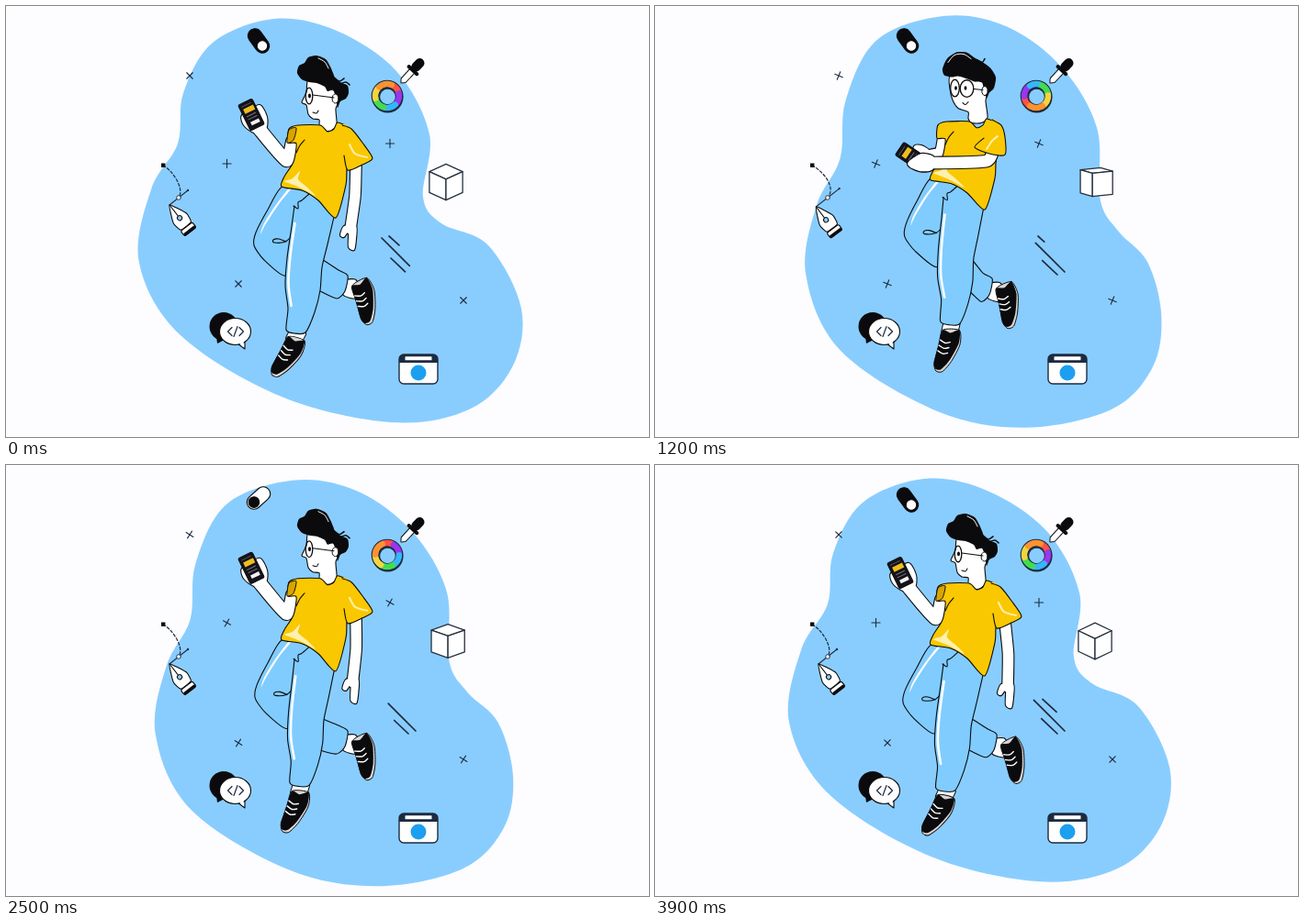
Recreate the animation shown at these times as an HTML page with a canvas. Size 700 px wide and 470 px high, loop 4 s.

```html
<!DOCTYPE html>
<html lang="en">
<head>
<meta charset="utf-8">
<title>Floating developer</title>
<style>
html, body { margin: 0; width: 100%; height: 100%; overflow: hidden; background: #fdfcfe; }
canvas { display: block; }
</style>
</head>
<body>
<canvas id="stage" width="700" height="470"></canvas>
<script>
const ctx = document.getElementById('stage').getContext('2d');
const LOOP = 4000, STEP = 100;
const INK = '#0b0b0d', NAVY = '#1d2b40', SKY = '#89cdff', DENIM = '#80ccff';
const YELLOW = '#fac800', CREAM = '#fff0ae', WHITE = '#fff';

const mix = (a, b, k) => a + (b - a) * k;
const clamp = x => Math.max(0, Math.min(1, x));
const span = (t, from, to) => clamp((t - from) / (to - from));
const ease = (t, from, to) => { const x = span(t, from, to); return x * x * (3 - 2 * x); };
const bump = (t, from, to) => Math.sin(Math.PI * span(t, from, to)) ** 2;
const pairs = list => Array.from({ length: list.length / 2 }, (_, i) => [list[2 * i], list[2 * i + 1]]);
const morph = (a, b, k) => a.map((p, i) => [mix(p[0], b[i][0], k), mix(p[1], b[i][1], k)]);

function trace(pts, closed = true, k = 0.12) {
  const n = pts.length;
  const at = i => closed ? pts[(i + n) % n] : pts[Math.max(0, Math.min(n - 1, i))];
  ctx.beginPath();
  ctx.moveTo(...pts[0]);
  for (let i = 0; i < (closed ? n : n - 1); i++) {
    const a = at(i - 1), b = at(i), c = at(i + 1), d = at(i + 2);
    ctx.bezierCurveTo(b[0] + (c[0] - a[0]) * k, b[1] + (c[1] - a[1]) * k,
      c[0] - (d[0] - b[0]) * k, c[1] - (d[1] - b[1]) * k, c[0], c[1]);
  }
  if (closed) ctx.closePath();
}
function paint(fill, stroke, width = 1.1) {
  if (fill) { ctx.fillStyle = fill; ctx.fill(); }
  if (stroke) { ctx.strokeStyle = stroke; ctx.lineWidth = width; ctx.stroke(); }
}
function shape(pts, fill, stroke, width, k) { trace(pts, true, k); paint(fill, stroke, width); }
function wire(list, color = INK, width = 1.1, k = 0.16) { trace(pairs(list), false, k); paint(null, color, width); }
function oval(x, y, rx, ry, fill, stroke, width) {
  ctx.beginPath(); ctx.ellipse(x, y, rx, ry, 0, 0, 7); paint(fill, stroke, width);
}
function box(x, y, w, h, r, fill, stroke, width) {
  ctx.beginPath(); ctx.roundRect(x, y, w, h, r); paint(fill, stroke, width);
}
function placed(x, y, degrees, draw) {
  ctx.save(); ctx.translate(x, y); ctx.rotate(degrees * Math.PI / 180); draw(); ctx.restore();
}

const BLOB_WIDE = pairs([292,14, 360,27, 425,71, 461,140, 454,208, 474,237, 525,261, 561,330, 551,394,
  504,440, 420,454, 300,426, 190,359, 145,280, 158,200, 187,150, 193,95, 225,40]);
const BLOB_TALL = pairs([322,10, 390,22, 448,67, 486,132, 492,212, 512,248, 539,284, 549,340, 539,395,
  495,440, 400,461, 310,446, 206,381, 169,297, 180,222, 205,170, 211,105, 246,36]);

function drawBlob(t) {
  const tall = t < 2000 ? Math.sin(Math.PI * t / LOOP) : 2 - t / 2000;
  const dip = 8 * Math.sin(Math.PI * span(t, 2000, LOOP));
  const pts = morph(BLOB_WIDE, BLOB_TALL, tall).map(([x, y]) => [x, y + dip * (1 - y / 460)]);
  shape(pts, SKY, null, 0, 1 / 6);
}

function drawToggle(t) {
  const on = ease(t, 1400, 1800) - ease(t, 2700, 3100);
  const light = on > 0.5;
  placed(275, 38 - 2 * on, 54 + 84 * on, () => {
    box(-14.5, -7.7, 29, 15.4, 7.7, light ? WHITE : INK, INK);
    oval(6.8, 0, 5.8, 5.8, light ? INK : WHITE, INK);
  });
}

function drawCrosses(t) {
  const sway = 45 - 25 * bump(t % 2000, 0, 2000), turn = 34 * bump(t, 0, LOOP);
  for (const [x, y, angle] of [[200, 76, sway], [253, 303, sway], [498, 321, sway], [240.5, 172, turn], [418, 150, turn]])
    placed(x, y, angle, () => { wire([-4.6,0, 4.6,0], NAVY); wire([0,-4.6, 0,4.6], NAVY); });
}

function drawPen(t) {
  const pull = bump(t, 0, 1400);
  const x = 178 - 14 * pull, y = 217 + 10 * pull, nx = 188, ny = 209;
  const ex = 2 * nx - x, ey = 2 * ny - y;
  ctx.setLineDash([3, 2.2]);
  ctx.beginPath(); ctx.moveTo(171, 174);
  ctx.bezierCurveTo(180, 178, mix(nx, ex, 1.3) - 6, mix(ny, ey, 1.3), nx, ny);
  paint(null, NAVY, 1.2);
  ctx.setLineDash([]);
  box(169, 171.5, 4.4, 4.4, 0, INK);
  wire([x, y, ex, ey], NAVY);
  oval(ex, ey, 1.2, 1.2, NAVY);
  oval(nx, ny, 2.3, 2.3, WHITE, NAVY, 0.9);
  placed(x, y, -38 + 6 * pull, () => {
    shape(pairs([0,0, 5,9, 9,19, 7,29, -7,29, -9,19, -5,9]), WHITE, INK, 1.1, 0.08);
    wire([0,0, 0,15], INK, 1);
    oval(0, 18, 2.6, 2.6, SKY, INK, 1);
    box(-8, 30, 16, 7, 2, WHITE, INK);
    box(-8, 34, 16, 3.5, 1.5, INK);
  });
}

function drawWheel(t) {
  oval(415.5, 99.5, 17, 17, NAVY);
  placed(415, 98, 320 - 360 * (1 - t / LOOP) ** 2.1, () => {
    ['#ff5145', '#9836f0', '#35b7fb', '#43dc50', '#f4d43d', '#ff922f'].forEach((color, i) => {
      const mid = i * Math.PI / 3;
      ctx.beginPath(); ctx.arc(0, 0, 13, mid - 0.53, mid + 0.53); paint(null, color, 7);
    });
  });
  oval(415, 98, 16.8, 16.8, null, NAVY);
  oval(415, 98, 9.7, 9.7, NAVY);
  oval(415.5, 99, 8.3, 8.3, SKY);
  placed(430, 84, 43, () => {
    shape(pairs([0,0, 3.3,-4, 3.3,-18, -3.3,-18, -3.3,-4]), WHITE, INK, 1, 0.03);
    box(-8, -21, 16, 4, 2, INK);
    box(-5.2, -35, 10.4, 16, 5.2, INK);
  });
}

function drawCube(t) {
  const a = Math.PI / 4 * (1 + Math.sin(Math.PI * span(t, 700, 2500) ** 1.3) ** 2);
  const b = Math.PI / 180 * (20 - 11 * Math.cos(2 * Math.PI * (t - 1450) / LOOP));
  const cx = 479 + 2.5 * bump(t, 0, LOOP), cy = 192, h = 12.8;
  const spot = ([x, y, z]) => {
    const depth = x * Math.sin(a) + z * Math.cos(a);
    return [cx + h * (x * Math.cos(a) - z * Math.sin(a)), cy + h * (y * Math.cos(b) + depth * Math.sin(b))];
  };
  const face = (...corners) => shape(corners.map(spot), WHITE, '#26303e', 1.3, 0);
  face([-1,-1,-1], [1,-1,-1], [1,-1,1], [-1,-1,1]);
  face([-1,-1,1], [1,-1,1], [1,1,1], [-1,1,1]);
  face([1,-1,1], [1,-1,-1], [1,1,-1], [1,1,1]);
}

function drawStreaks(t) {
  const cycle = LOOP / 3, phase = (t + cycle - 3) % cycle;
  const streak = (x, y, X, Y, s, e) => {
    if (e - s > 0.01) wire([mix(x, X, s), mix(y, Y, s), mix(x, X, e), mix(y, Y, e)], NAVY, 1.7);
  };
  for (const start of [625, 1180, 1303])
    streak(417, 251, 439, 271, span(phase, start + 36, start + 100), span(phase, start, start + 55));
  const tail = phase < 500 || phase > 1325 ? 0 : 1 - span(phase, 640, 1290);
  const head = phase < 500 ? 0.82 * (1 - phase / 500) : phase > 1325 ? 0.82 : 1;
  streak(409, 253, 446, 290, tail, head);
  streak(419, 275, 438, 293, tail, head);
}

function drawChat() {
  shape(pairs([229,360, 230,368, 238,364]), INK, null, 0, 0);
  oval(237, 349.5, 15.5, 15.5, INK);
  shape(pairs([252,368, 260,374, 260,365]), WHITE, INK, 1.1, 0);
  oval(249.5, 355, 17, 14.5, WHITE, INK);
  shape(pairs([251,365, 258.5,372, 259,363]), WHITE, null, 0, 0);
  for (const side of [-1, 1])
    wire([250 + 4*side,350.5, 250 + 8.5*side,355, 250 + 4*side,359.5], NAVY, 1.2, 0);
  wire([252,349.5, 248,360.5], NAVY, 1.2, 0);
}

function drawWindow() {
  box(428, 380, 42, 32, 5, WHITE, NAVY, 1.4);
  box(428, 380, 42, 9, [5, 5, 0, 0], NAVY);
  box(434.5, 382.2, 29, 4, 0.5, WHITE);
  oval(449, 400, 8.5, 8.5, '#1d9ff0');
}

function drawShoe(x, y, turn) {
  placed(x, y, turn, () => {
    shape(pairs([9,0, 13,15, 8,35, 1,48, -6,49, -10,41, -9,22, -9,4]), '#d9d4d2', INK, 0.9);
    shape(pairs([9,0, 11.5,14, 6,34, -1,46, -7,47, -10,41, -10,22, -9,4, 0,5]), INK);
    for (const row of [15, 21, 27]) wire([-9, row, -3, row + 2, 2, row], WHITE, 1.4);
  });
}

const THIGH = pairs([301,197, 285,222, 272,247, 270,261, 281,277, 304,294, 312,262, 330,205]);
const LEG = pairs([314,218, 311,240, 306,275, 304,305, 307,330, 305,353, 314,357, 326,356, 336,334, 342,310,
  344,285, 350,260, 357,230, 340,205, 325,203]);

function drawLegs(t, lift) {
  const sway = pts => pts.map(([x, y]) => [x + 6 * lift * span(y, 215, 355), y - 10 * lift]);
  const kick = bump(t, 0, 1500);
  const fx = 384 - 14 * kick, fy = 299 + 10 * kick - 8 * bump(t, 2000, LOOP);

  shape([[fx - 17, fy + 1], [fx - 4, fy - 1], [fx + 1, fy + 8], [fx - 3, fy + 20], [fx - 17, fy + 16]], WHITE, INK);
  drawShoe(fx, fy, -17 + 13 * kick);
  shape([[330, 270], [345, 277], [fx - 22, fy - 11], [fx - 12, fy - 5], [fx - 15, fy + 12], [fx - 24, fy + 20], [342, 311], [325, 303]], DENIM, INK);

  shape(sway(THIGH), DENIM, INK);
  shape(sway(pairs([306,201, 291,221, 280,239, 277,249, 282,239, 297,216, 310,200])), WHITE);
  wire(sway(pairs([313,249, 304,257, 292,258, 291,255, 297,254, 305,257])).flat());

  const [ankle] = sway([[317, 357]]), tilt = 27 - 15 * lift;
  placed(...ankle, tilt, () => box(-9, -5, 18, 16, 2, WHITE, INK, 1));
  drawShoe(ankle[0], ankle[1] + 4, tilt);
  const leg = sway(LEG);
  shape(leg, DENIM);
  trace(leg.slice(0, 13), false); paint(null, INK);
  wire(leg.slice(1, 5).flatMap(([x, y]) => [x + 3.5, y - 3]), WHITE, 2.6);
  wire(sway(pairs([330,205, 322,212, 318,214, 318,221, 313,218])).flat());
}

function drawArm(joints, width, hand) {
  trace(joints, false, 0.1); paint(null, INK, width + 2.2);
  shape(hand, WHITE, INK, 2.2);
  trace(joints, false, 0.1); paint(null, WHITE, width);
  shape(hand, WHITE);
}

function drawPhone(p, lit) {
  placed(mix(267, 279, p), mix(118.5, 173, p), mix(-26, -56, p), () => {
    box(-8.5, -15.5, 17, 31, 2, '#15131a', INK, 1);
    wire([-6,-12, 5,-12], '#55525c', 1);
    if (!lit) return;
    box(-5.5, -9, 12, 5.5, 0, '#f0bd1d');
    for (const y of [0, 3.5]) wire([-5, y, 5, y], '#77727c', 1);
    box(-4.5, 7, 10, 4, 0, '#f4f1f2');
  });
}

const SHIRT = pairs([342,130, 318,130, 308,134, 307,149, 316,150, 313,170, 303,186, 300,197, 322,201, 340,212, 359,231,
  370,195, 371,178, 374,152, 372,133, 361,127, 357,134, 350,137]);
const SLEEVE = [pairs([366,130, 376,134, 388,149, 399,166, 388,173, 372,179, 368,163]),
  pairs([367,133, 377,139, 381,152, 381,171, 364,170, 348,163, 358,153])];
const NEAR_HAND = [pairs([368,240, 364,250, 368,252, 373,246, 373,263, 379,266, 381,254, 381,240]),
  pairs([303,173, 290,170, 278,177, 275,181, 278,185, 288,189, 298,189, 303,186])];
const FAR_HAND = [pairs([257,119, 259,130, 270,138, 283,134, 284,121, 276,108]),
  pairs([282,162, 290,161, 300,168, 300,182, 288,186, 280,178])];

function drawSideHead() {
  shape(pairs([329,80, 327,94, 322,105, 327,108, 329,118, 334,123, 341,124, 341,131, 345,136, 354,136, 360,129, 359,112, 363,102, 358,92, 345,82]), WHITE, INK);
  shape(pairs([330,83, 322,80, 317,73, 319,65, 325,62, 329,56, 338,54, 348,58, 353,66, 356,73, 359,80, 366,84, 372,87, 373,95, 370,101, 364,104, 361,111, 359,99, 356,92, 350,93, 347,88, 338,84]), INK);
  wire([357,78, 363,82, 368,79], INK, 1.6);
  wire([364,85, 370,83, 374,86], INK, 1.6);
  wire([340,57, 347,61, 351,68], WHITE, 1);
  oval(358.5, 101, 3.4, 5, WHITE, INK, 1);
  oval(330, 98, 3.8, 8.8, null, INK, 1.3);
  oval(330.5, 98, 1.5, 2.4, INK);
  wire([334,97, 357,100]);
  wire([334,116, 338,117, 340,114]);
}
function drawFrontHead() {
  shape(pairs([321,77, 321,91, 324,103, 330,112, 341,116, 341,123, 345,128, 355,128, 362,122, 360,104, 362,94, 356,82, 338,74]), WHITE, INK);
  shape(pairs([323,78, 315,76, 313,69, 318,58, 328,51, 339,51, 348,57, 357,62, 365,68, 371,78, 369,90, 364,95, 361,101, 358,92, 356,84, 348,83, 340,80, 330,77]), INK);
  wire([350,59, 356,62, 359,58], INK, 1.6);
  wire([319,62, 326,54, 336,53, 344,58], WHITE, 1);
  oval(359, 93, 3.2, 5, WHITE, INK, 1);
  oval(326.5, 90, 4.8, 9.3, WHITE, INK, 1.3);
  oval(339.5, 90.5, 7.3, 9.3, WHITE, INK, 1.3);
  for (const x of [327.5, 338]) oval(x, 90, 1.4, 2.2, INK);
  wire([347,91, 357,92]);
  wire([335,106, 338,108, 341,105]);
}

function drawPerson(t) {
  const lift = bump(t % 2000, 0, 2000) ** 0.6;
  const p = ease(t, 100, 600) - ease(t, 1400, 1900);
  drawLegs(t, lift);

  ctx.save();
  ctx.translate(0, -9.5 * lift);
  const farArm = morph(pairs([312,148, 305,168, 274,132]), pairs([314,150, 310,168, 296,172]), p);
  drawArm(farArm, mix(14, 11, p), morph(...FAR_HAND, p));
  drawPhone(p, p < 0.5 || t >= 1000);

  if (p > 0.5) placed(0, 8.5, 0, drawFrontHead);
  else drawSideHead();

  shape(SHIRT.map(([x, y]) => [x, y + 5 * p * span(y, 230, 130)]), YELLOW, INK);
  if (p < 0.5) shape(pairs([308,135, 306,149, 313,146, 316,133]), '#d9a400', INK, 1);
  shape(pairs([303,191, 312,188, 320,180, 318,189, 327,197, 337,207, 322,199, 310,194]), CREAM);
  wire([316,160, 320,152, 325,146]);

  const swing = 9 * span(t, 2000, 3900);
  const arm = morph([[381, 172], [380 + swing / 2, 207], [375 + swing, 243]], pairs([369,160, 361,178, 303,180]), p);
  const hand = morph(NEAR_HAND[0].map(([x, y]) => [x + swing, y]), NEAR_HAND[1], p);
  drawArm(arm, mix(11.5, 12.5, p), hand);

  const sleeve = morph(...SLEEVE, p);
  shape(sleeve, YELLOW);
  trace(sleeve, false); paint(null, INK);
  trace(morph(pairs([374,151, 380,161, 393,165]), pairs([373,151, 367,156, 361,165]), p), false, 0.16);
  paint(null, CREAM, 2);
  ctx.restore();
}

function frame(now) {
  const t = Math.floor(now % LOOP / STEP) * STEP;
  ctx.lineCap = ctx.lineJoin = 'round';
  ctx.fillStyle = '#fdfcfe';
  ctx.fillRect(0, 0, 700, 470);
  for (const draw of [drawBlob, drawCrosses, drawToggle, drawWheel, drawCube, drawPen, drawStreaks, drawChat, drawWindow, drawPerson])
    draw(t);
}

const start = performance.now();
function tick() {
  frame(performance.now() - start);
  requestAnimationFrame(tick);
}
tick();
</script>
</body>
</html>
```
